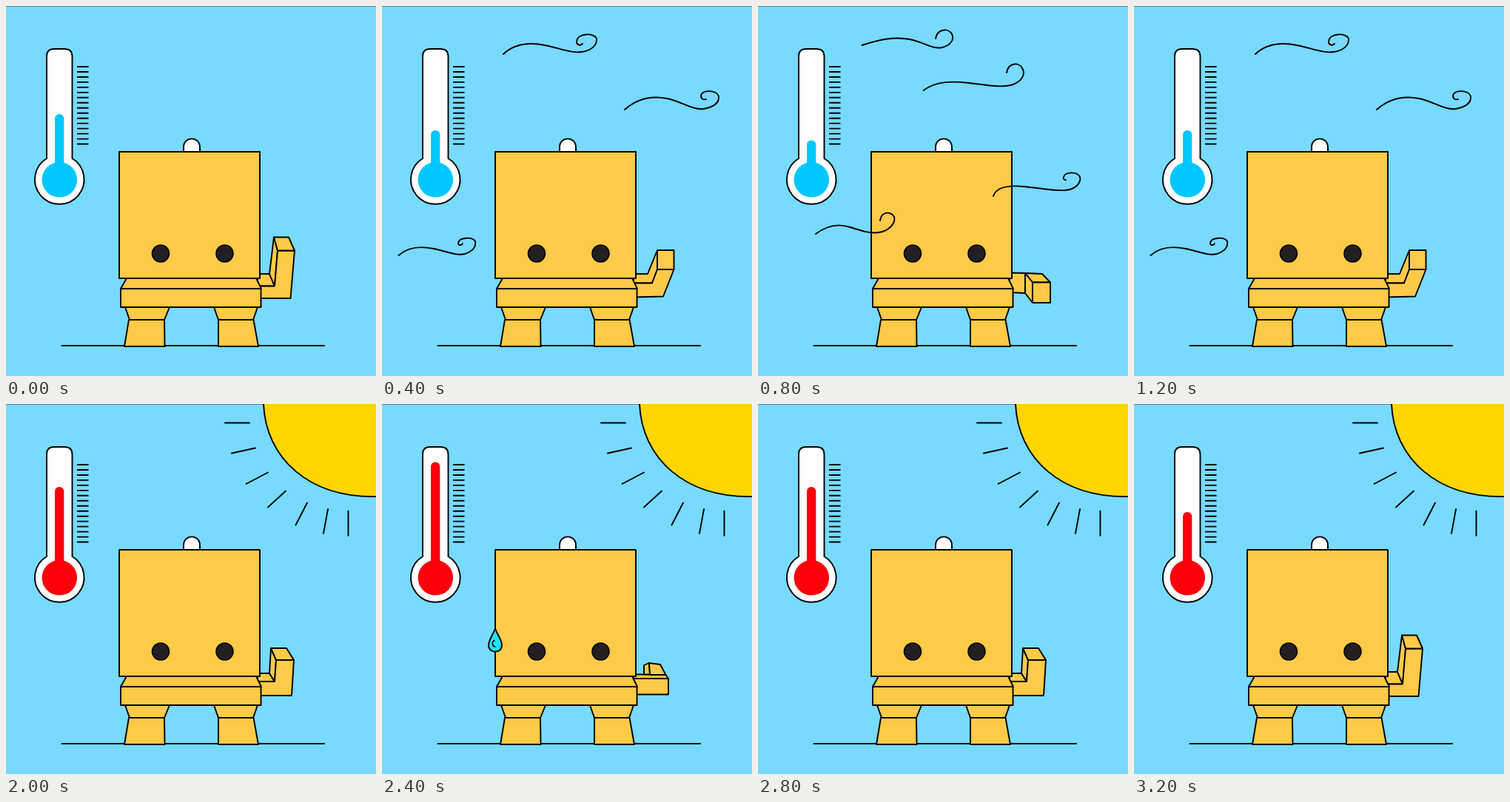
An HTML page for the animation above (3.3 s loop, 500 by 500 pixels).

```html
<!DOCTYPE html>
<html lang="en">
<head>
<meta charset="utf-8">
<title>Cold and hot</title>
<style>
html, body { margin: 0; width: 100%; height: 100%; overflow: hidden; background: #78daff; }
svg { display: block; width: 100vw; height: 100vh; }
.line { fill: none; stroke: #000; stroke-width: 1.9; stroke-linecap: round; stroke-linejoin: round; }
.skin { fill: #ffca47; }
.white { fill: #fff; }
</style>
</head>
<body>
<svg viewBox="0 0 500 500">
  <rect width="500" height="500" fill="#78daff"/>
  <rect width="500" height="1" opacity=".35"/>

  <g id="sun" class="line">
    <path fill="#ffd500" d="M348 -4V0C351 72 408 128 504 125V-4Z"/>
    <path d="M296 25.5H329M305 66.5L337 59.500M324.500 108L354 92.500M354 139.500L378 117.500M391.500 163.500L407 133.500M429 175L435 142M462.500 178V144.500"/>
  </g>

  <path class="line white" d="M55 206V68Q55 58 65 58H79Q89.500 58 89.500 68V206A33.300 33.300 0 1 1 55 206Z"/>
  <g id="fluid">
    <circle cx="72.300" cy="234.800" r="23.800"/>
    <rect id="column" x="66" width="12.300" rx="6"/>
  </g>
  <path id="ticks" class="line" style="stroke-linecap:butt"/>

  <path class="line" d="M75.500 459H430"/>
  <g id="tail" class="line"></g>
  <g class="line skin">
    <path class="white" d="M240 198V191C240 175.500 262 175.500 262 191V198Z"/>
    <path d="M161 407H221L214 424H167Z"/>
    <path d="M166 424H214L214.500 460H160Z"/>
    <path d="M281 407H340L334 424H287Z"/>
    <path d="M287 424H334.500L341 460H287Z"/>
    <path d="M163 368H338L345 382H155Z"/>
    <path d="M155 382H344.500V407H155Z"/>
    <path d="M153 197H343V368H153Z"/>
  </g>
  <g fill="#231f20" stroke="#000" stroke-width="1.500">
    <circle cx="209" cy="334.500" r="11.500"/>
    <circle cx="295.500" cy="334.500" r="11.500"/>
  </g>

  <g id="drop" class="line">
    <path fill="#20e4f4" d="M153 303.500C150 312 144 319 144 326C144 337.500 162 337.500 162 326C162 319 156 312 153 303.500Z"/>
    <path stroke-width="1.500" d="M152 319.500C147.500 322 149 327.500 153 328"/>
  </g>
  <path id="wind" class="line"/>
</svg>
<script>
const $ = id => document.getElementById(id);

// Each tail pose is a list of faces, painted back to front.
const tails = {
  up: [
    "M340 362H356L363 378.500H340Z",
    "M362 312.500L367 330.500L363 378.500L356 362Z",
    "M367 330.500H390L384.500 395H340V378.500H363Z",
    "M362 312.500H382L390 330.500H367Z"
  ],
  bent: [
    "M340 362H359L372 330V356L365 374.500H340Z",
    "M372 356H394.500L380 392.500L340 393.500V374.500H365Z",
    "M372 330H394.500V356H372Z"
  ],
  front: [
    "M340 360.500L361 361V388L340 387Z",
    "M361 361L384 362L395 373.500H371Z",
    "M361 361L371 373.500V401L361 388Z",
    "M371 373.500H395V401H371Z"
  ],
  leaning: [
    "M340 364H356L363 375H340Z",
    "M358 330L365 346L363 375L356 364Z",
    "M365 346H389L386 394H340V375H363Z",
    "M358 330H379L389 346H365Z"
  ],
  back: [
    "M340 365.500H383L387 371H340Z",
    "M354 365.500V353L361 350L362 365.500Z",
    "M361 350L376 352L383.500 366H362Z",
    "M340 371H387V392.500H340Z"
  ]
};

const gusts = {
  none: "",
  near: "M140.500 53C165 45 185 41 205 45S236 59 249 56C260 53 266 45 262 38C257 29 242 31 240 44" +
    "M223.500 114C240 102 260 101 285 104S330 111 345 106C357 101 362 92 357 84C352 75 338 77 336 90" +
    "M318 257C322 244 340 242 360 244S400 250 415 249C430 248 437 238 435 231C431 223 415 224 413 231C412 234 414 235 416 235" +
    "M78 308C95 295 110 294 125 299S155 309 168 305C180 301 186 292 184 285C181 278 167 276 165 290",
  far: "M164 65C180 50 200 49 220 53S255 64 270 62C285 60 291 51 290 44C287 36 264 36 263 48C263 53 268 54 271 51" +
    "M328 140C345 125 365 121 385 125S420 141 435 139C450 136 456 130 455 122C452 113 432 113 431 121C431 126 435 127 438 126" +
    "M22.500 337C35 326 50 324 70 328S100 338 112 335C124 331 127 324 126 318C122 311 104 313 103 320C103 324 107 324 109 321"
};

// tail, top of the column, wind, hot, sweating
const steps = [
  ["up", 146, "none", false, false],
  ["bent", 168, "far", false, false],
  ["front", 181.5, "near", false, false],
  ["bent", 168, "far", false, false],
  ["up", 146, "none", true, false],
  ["leaning", 112, "none", true, false],
  ["back", 78.5, "none", true, true],
  ["leaning", 112, "none", true, false],
  ["up", 146, "none", true, false]
];
const STEP = 400, LOOP = 3300;

$("ticks").setAttribute("d",
  Array.from({ length: 16 }, (_, i) => `M96 ${82 + i * 6.97}H111.5`).join(""));

function show([tail, top, wind, hot, sweat]) {
  $("tail").innerHTML = tails[tail].map(d => `<path class="skin" d="${d}"/>`).join("");
  $("column").setAttribute("y", top);
  $("column").setAttribute("height", 230 - top);
  $("fluid").setAttribute("fill", hot ? "#ff0009" : "#00c8ff");
  $("wind").setAttribute("d", gusts[wind]);
  $("sun").style.display = hot ? "" : "none";
  $("drop").style.display = sweat ? "" : "none";
}

const start = performance.now();
let shown = -1;
function tick(now) {
  const i = Math.floor(Math.max(0, now - start) % LOOP / STEP);
  if (i !== shown) show(steps[shown = i]);
  requestAnimationFrame(tick);
}
tick(start);
</script>
</body>
</html>
```
